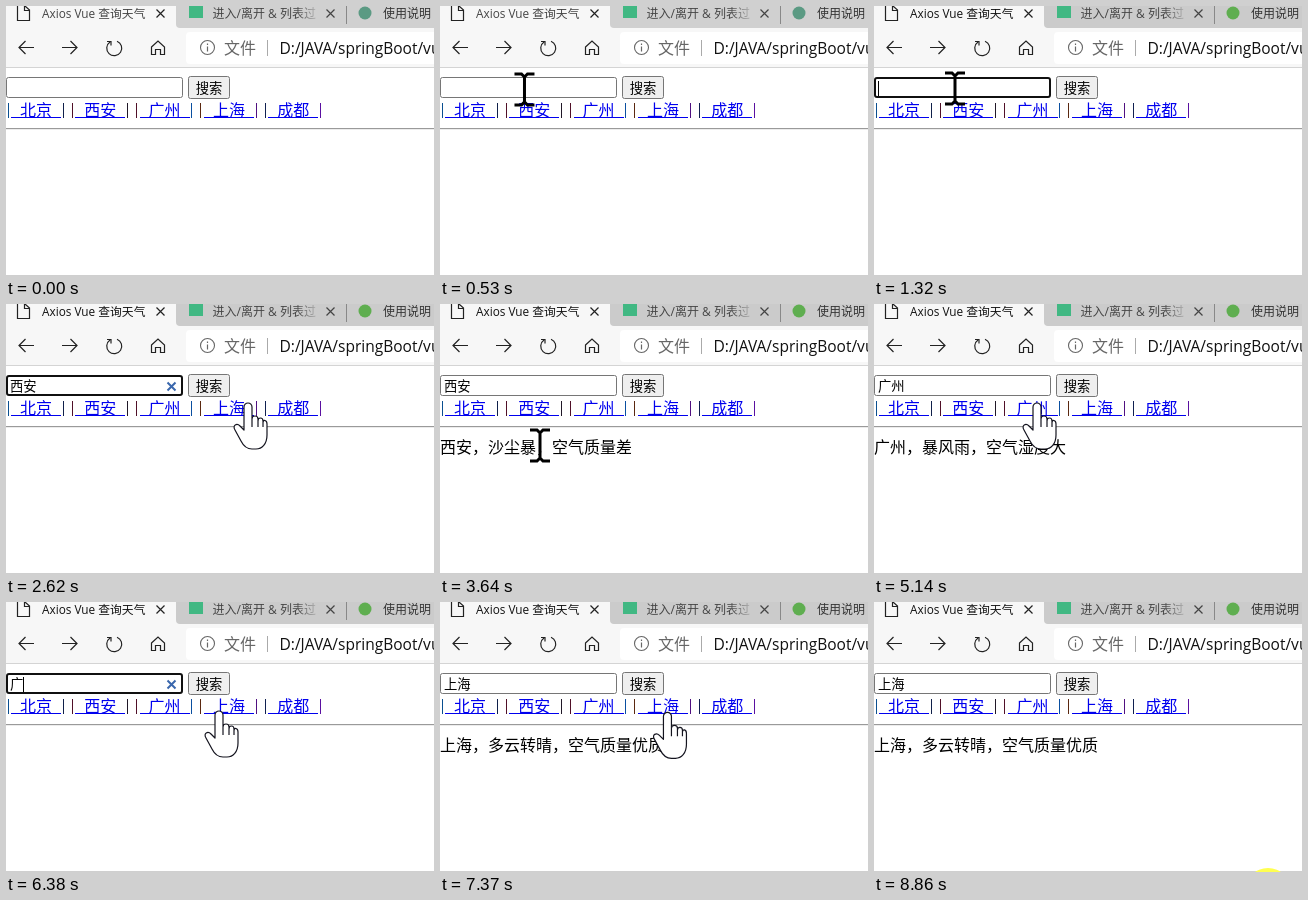
An HTML page that plays this animation: 428x270 px, repeating every 8960 ms.

```html
<!DOCTYPE html>
<html lang="zh-CN">
<head>
<meta charset="utf-8">
<style>
html, body { margin: 0; width: 100%; height: 100%; overflow: hidden; background: #fff; }
svg { display: block; width: 428px; height: 270px; }
text { font: 16px "Open Sans", "Noto Sans CJK SC", "Noto Sans CJK", sans-serif; white-space: pre; }
.tab { font-size: 12px; }
.form { font-size: 13.333px; }
.url { font-size: 15.5px; }
.line { fill: none; stroke: #222; stroke-width: 1.2; }
.pointer { fill: #fff; stroke: #14141f; stroke-width: 1.2; stroke-linejoin: round; }
.beam { fill: none; stroke: #000; stroke-width: 3; }
</style>
</head>
<body>
<svg viewBox="0 0 428 270">
  <defs>
    <linearGradient id="fade" gradientUnits="userSpaceOnUse" x1="290" x2="313">
      <stop stop-color="#444"/><stop offset="1" stop-color="#444" stop-opacity=".1"/>
    </linearGradient>
  </defs>

  <!-- tabs -->
  <rect width="428" height="62" fill="#f7f7f7"/>
  <path id="strip" d="M170 0V18q0 4 4 4H428V0z" fill="#cbcbcb"/>
  <path class="line" d="M11.5 0V14.5H23.5V4L19 0M18.5 0V4.500H23.500"/>
  <text id="title" class="tab" x="36" y="11.500" style="font-size:11.8px">Axios Vue 查询天气</text>
  <path class="line" d="M150.500 3.500l8 8m0-8l-8 8"/>
  <rect x="183" y="0" width="14" height="12" fill="#41b883"/>
  <text class="tab" x="206.500" y="11.500" fill="url(#fade)">进入/离开 &amp; 列表过</text>
  <path class="line" d="M320.500 3.500l8 8m0-8l-8 8" style="stroke:#444"/>
  <path class="line" d="M340.500 0V18" style="stroke:#888;stroke-width:1"/>
  <circle id="dot" cx="359" cy="7" r="6.500"/>
  <text class="tab" x="377" y="11.500" fill="#333">使用说明</text>

  <!-- toolbar -->
  <path class="line" d="M28 41.500H13M19.500 35l-6.500 6.500 6.500 6.500M56 41.500H71M64.500 35l6.500 6.500-6.500 6.500"/>
  <path class="line" d="M104 36A7.500 7.500 0 1 0 111 35.200M101 35.500H105V39.500"/>
  <path class="line" d="M145.500 41L152 35l6.500 6V48.500H154.500V43.500H149.500V48.500H145.500z"/>
  <path d="M428 26H184q-4 0-4 4V54q0 4 4 4H428z" fill="#fff"/>
  <circle class="line" cx="201.500" cy="41.500" r="7" style="stroke:#666;stroke-width:1.1"/>
  <path class="line" d="M201.500 40.500V45.500M201.500 37.500V39" style="stroke:#666"/>
  <text x="218" y="47.500" fill="#666">文件</text>
  <path class="line" d="M261.500 34V50" style="stroke:#aaa;stroke-width:1"/>
  <text class="url" x="273.500" y="47.500" fill="#111">D:/JAVA/springBoot/vue</text>
  <rect y="61" width="428" height="1" fill="#d4d4d4"/>

  <!-- page -->
  <rect y="62" width="428" height="208" fill="#fff"/>
  <rect id="box" fill="#fff"/>
  <text id="word" class="form" x="4" y="87"></text>
  <path id="clear" d="M161.500 78.500l8 8m0-8l-8 8" stroke="#3a67ad" stroke-width="2"/>
  <rect id="caret" y="75" width="1" height="15"/>
  <rect x="182.500" y="70.500" width="41" height="22" rx="2" fill="#efefef" stroke="#767676"/>
  <text class="form" x="189.700" y="87">搜索</text>
  <g id="links"></g>
  <rect y="122" width="428" height="1" fill="#9a9a9a"/>
  <rect y="123" width="428" height="1" fill="#ececec"/>
  <text id="result" x="0" y="149"></text>
  <rect y="269" width="428" height="1" fill="#cfcfcf"/>
  <circle id="halo" cx="394" cy="289" r="23" fill="#ffff50"/>

  <!-- pointers -->
  <path id="arrow" class="pointer" d="M1 1V33l8-7 5 12 5-2-5-12h10z"/>
  <path id="beam" class="beam" d="M-10-15H-3L0-12 3-15H10M0-13V14M-10 16H-3L0 13 3 16H10"/>
  <path id="hand" class="pointer" d="M-4 4a4 4 0 0 1 8 0V16c0-4 6-4 6 0v2c0-4 5-4 5 0v2c0-4 4-3 4 1V32c0 9-5 14-11 14H4c-6 0-9-4-11-8L-13 27c-3-5 2-7 5-4l4 4zM4 16v8M10 18v6M15 20v4"/>
</svg>
<script>
const LOOP = 8960, PITCH = 64.3, EM = 13.333;
const $ = id => document.getElementById(id);
const set = (el, attrs) => { for (const k in attrs) el.setAttribute(k, attrs[k]); };
const show = (el, on) => { el.style.display = on ? '' : 'none'; };

const xian = '西安，沙尘暴，空气质量差';
const guangzhou = '广州，暴风雨，空气湿度大';
const shanghai = '上海，多云转晴，空气质量优质';

// time, input text, result, focused, caret visible
const states = [
  [0, '', '', 0, 0],
  [540, '', '', 1, 1],
  [940, '', '', 1, 0],
  [1320, '', '', 1, 1],
  [1550, '西', '', 1, 1],
  [1850, '西安', '', 1, 1],
  [2320, '西安', '', 1, 0],
  [3000, '西安', xian, 0, 0],
  [4600, '广州', guangzhou, 0, 0],
  [5520, '广州', guangzhou, 1, 1],
  [6050, '广', '', 1, 1],
  [7070, '广', '', 1, 0],
  [7280, '上海', shanghai, 0, 0]
];

// time, x, y of the pointer's hot spot
const path = [
  [0, 440, 178], [70, 426, 178], [560, 81, 82],
  [2280, 81, 82], [2620, 242, 99], [2710, 242, 99], [2780, 229, 95],
  [2880, 229, 95], [3000, 218, 86], [3360, 218, 86],
  [3640, 100, 141], [3700, 100, 141], [3890, 79, 103],
  [3980, 79, 103], [4500, 163, 99], [5150, 163, 99],
  [5500, 90, 88], [6060, 90, 88],
  [6380, 213, 109], [6450, 213, 109], [6600, 222, 109],
  [7290, 222, 109], [7620, 258, 118],
  [8010, 258, 118], [8155, 338, 240], [8230, 394, 300], [LOOP, 394, 300]
];

const bars = ['#0a4f90', '#10204a', '#501028', '#201828', '#501028',
              '#0a4fa0', '#5a2810', '#501080', '#102050', '#5a10a0'];
$('links').innerHTML = ['北京', '西安', '广州', '上海', '成都'].map((city, i) => {
  const x = i * PITCH;
  const bar = (dx, n) => `<rect x="${Math.round(x + dx)}" y="97" width="1" height="15" fill="${bars[2 * i + n]}"/>`;
  return `${bar(1.5, 0)}<text x="${x + 14}" y="110" fill="#00e">${city}</text>
    <rect x="${Math.round(x + 5)}" y="111" width="50" height="1" fill="#00e"/>${bar(56.7, 1)}`;
}).join('');

const last = (list, t) => list.findLastIndex(row => row[0] <= t);

function spot(t) {
  const i = Math.min(last(path, t), path.length - 2);
  const [t0, x0, y0] = path[i], [t1, x1, y1] = path[i + 1];
  const p = (t - t0) / (t1 - t0), e = p * p * (3 - 2 * p);
  return [x0 + (x1 - x0) * e, y0 + (y1 - y0) * e];
}

function pointerAt(x, y, result) {
  if (y > 70 && y < 94) {
    if (x < 177) return 'beam';
    if (x > 182 && x < 224) return 'hand';
  }
  if (y >= 94 && y < 115 && x < 318) {
    const dx = x % PITCH;
    return dx > 4 && dx < 56 ? 'hand' : 'beam';
  }
  return y > 134 && y < 152 && x < result.length * 16 ? 'beam' : 'arrow';
}

function draw(t) {
  const [, word, result, focus, caret] = states[last(states, t)];
  const awake = t >= 540;
  set($('strip'), { fill: awake ? '#cbcbcb' : '#d0d0d0' });
  set($('title'), { fill: awake ? '#111' : '#444' });
  set($('dot'), { fill: awake ? '#5fae50' : '#5b9a83' });

  set($('box'), focus
    ? { x: 1, y: 72, width: 175, height: 19, rx: 2, stroke: '#101010', 'stroke-width': 2 }
    : { x: .5, y: 71.5, width: 176, height: 20, rx: 2, stroke: '#767676', 'stroke-width': 1 });
  $('word').textContent = word;
  $('result').textContent = result;
  show($('clear'), focus && word);
  show($('caret'), caret);
  set($('caret'), { x: Math.round(4 + word.length * EM) });
  show($('halo'), t >= 8860);

  const [x, y] = spot(t), kind = pointerAt(x, y, result);
  for (const id of ['arrow', 'beam', 'hand']) show($(id), id === kind);
  set($(kind), { transform: `translate(${x} ${y})` });
}

const start = performance.now();
function tick() {
  draw((performance.now() - start) % LOOP);
  requestAnimationFrame(tick);
}
tick();
</script>
</body>
</html>
```
